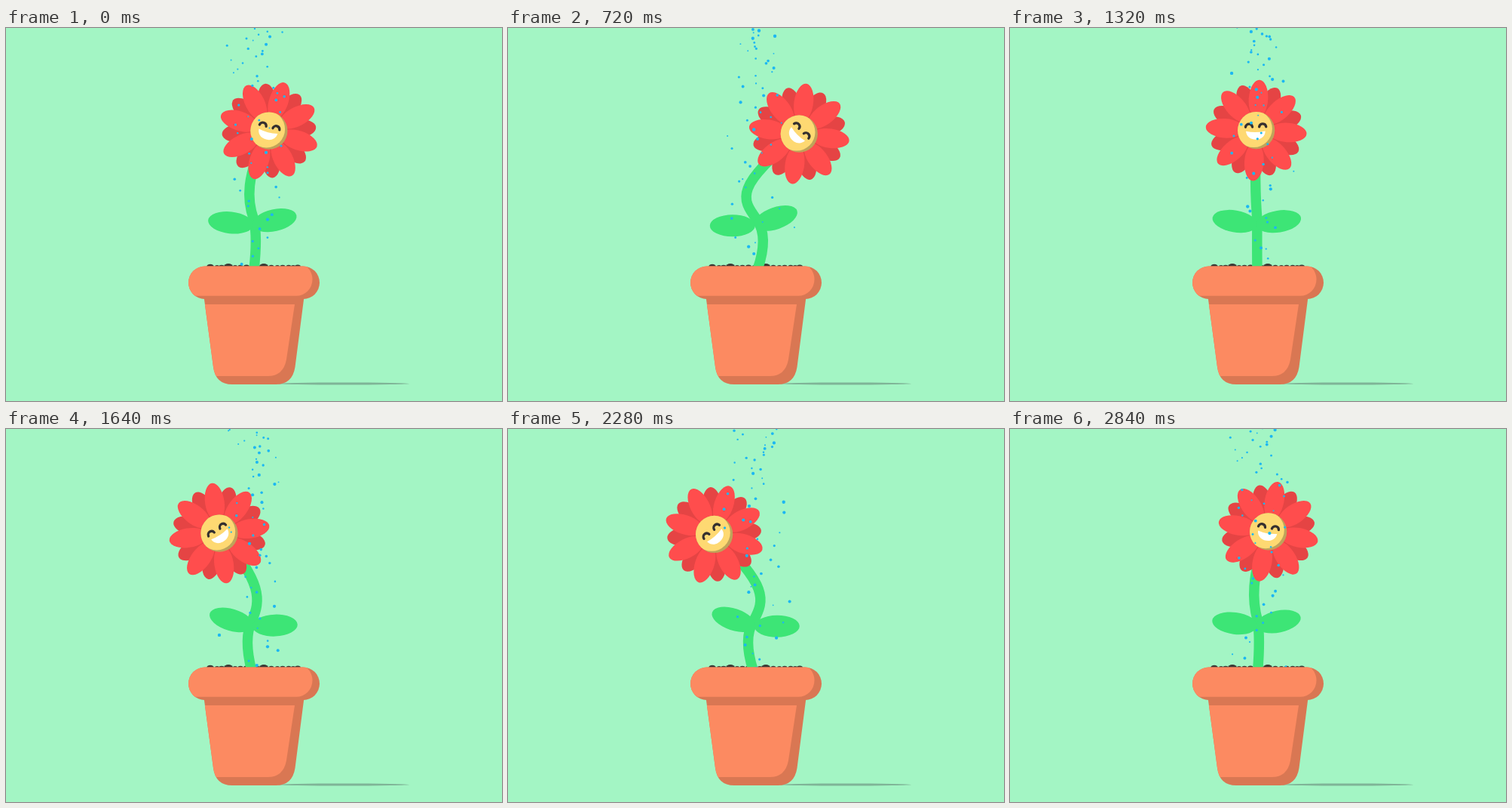
An HTML page with a canvas for the animation above (2.88 s loop, 658x494 px).

```html
<!DOCTYPE html>
<html lang="en">
<head>
<meta charset="utf-8">
<title>Dancing flower</title>
<style>
  html, body { margin: 0; width: 100%; height: 100%; overflow: hidden; background: #a3f5c4; }
  canvas { display: block; width: 658px; height: 494px; }
</style>
</head>
<body>
<canvas id="stage" width="658" height="494"></canvas>
<script>
const ctx = document.getElementById('stage').getContext('2d');
const LOOP = 2880, STEP = 40, TAU = Math.PI * 2;
const C = {
  bg: '#a3f5c4', green: '#3de576', petal: '#ff4d4d', petalBack: '#e54444',
  face: '#fed972', faceShade: '#bfa35a', ink: '#35302f', soil: '#3c3935',
  pot: '#fc8a61', potShade: '#d97753', ground: '#7fb497', water: '#1cb7f2'
};
const rad = d => d * Math.PI / 180;

function seeded(seed) {
  return () => {
    seed = (seed * 1664525 + 1013904223) >>> 0;
    return seed / 4294967296;
  };
}

const rand = seeded(41);
const spread = () => rand() + rand() - 1;
const drops = Array.from({ length: 280 }, (_, i) => ({
  birth: (i + rand()) / 280 * LOOP,
  x: 330 + spread() * 42,
  vx: spread() * 50,
  r: 0.9 + rand() * 1.3
}));

// Cubic ease (.45, 0, .55, 1)
function ease(x) {
  let lo = 0, hi = 1;
  for (let i = 0; i < 24; i++) {
    const m = (lo + hi) / 2;
    if (1.35 * m - 1.05 * m * m + 0.7 * m * m * m < x) lo = m; else hi = m;
  }
  return lo * lo * (3 - 2 * lo);
}

// Sway from -1 (left) to 1 (right)
function swayAt(t) {
  const u = ((t - 2032 + LOOP) % LOOP) / (LOOP / 2);
  return 2 * ease(u > 1 ? 2 - u : u) - 1;
}

function fill(color, trace) {
  ctx.fillStyle = color;
  ctx.beginPath();
  trace();
  ctx.fill();
}

function disc(color, x, y, rx, ry = rx) {
  fill(color, () => ctx.ellipse(x, y, rx, ry, 0, 0, TAU));
}

function placed(x, y, angle, draw) {
  ctx.save();
  ctx.translate(x, y);
  ctx.rotate(angle);
  draw();
  ctx.restore();
}

// A lit copy clipped to the shaded silhouette
function shaded(dark, light, outline, lit) {
  fill(dark, outline);
  ctx.save();
  ctx.beginPath();
  outline();
  ctx.clip();
  fill(light, lit);
  ctx.restore();
}

function drawSoil() {
  const bumps = [[271, 5], [280, 3], [286, 3.4], [295, 6], [304, 3], [311, 3.4], [319, 4],
    [327, 3], [334, 3.2], [342, 6], [352, 3.6], [360, 3], [367, 3.4], [375, 3.6], [381, 3], [387, 4]];
  for (const [x, r] of bumps) disc(C.soil, x, 316.2, r, r * 0.7);
}

function drawStem(s, hx, hy) {
  ctx.strokeStyle = C.green;
  ctx.lineWidth = 13.5;
  ctx.lineCap = 'butt';
  ctx.beginPath();
  ctx.moveTo(328 + 3 * s, 320);
  ctx.bezierCurveTo(328 + 12 * s, 295, 328 + 15 * s, 272, 328 + 2.5 * s, 254);
  ctx.bezierCurveTo(325.5 - 17.5 * s, 230 - 5 * s * s, 324 - 23.5 * s, 195 + 16 * s * s, hx, hy);
  ctx.stroke();
}

function drawLeaf(side, s) {
  placed(327.3, 261 + 0.7 * s * s, rad(-10 * s - 9.5 * side), () => {
    disc(C.green, side * 29.5, 0, 30, 14.5);
  });
}

function drawPetals(color, length, phase) {
  for (let i = 0; i < 8; i++) {
    placed(0, 0, rad(phase + i * 45), () => disc(color, 0, 25.5 - length, 12.8, 25.5));
  }
}

function drawFace() {
  ctx.strokeStyle = C.ink;
  ctx.lineWidth = 3.3;
  ctx.lineCap = 'round';
  for (const x of [-9.6, 8.6]) {
    ctx.beginPath();
    ctx.arc(x, -4, 4.6, Math.PI * 1.04, Math.PI * 1.96);
    ctx.stroke();
  }
  fill('#fff', () => {
    ctx.moveTo(-13.6, 1);
    ctx.quadraticCurveTo(-0.8, 4, 12, 1);
    ctx.bezierCurveTo(11.5, 16, -13, 16, -13.6, 1);
  });
}

function drawHead(t, s, x, y) {
  const tilt = 46.5 * s;
  const turn = t / LOOP;
  const phase = tilt + 8 + 180 * turn - 4.5 * Math.cos(TAU * turn);
  placed(x, y, 0, () => {
    drawPetals(C.petalBack, 62.5, phase + 22.5);
    drawPetals(C.petal, 67, phase);
    shaded(C.faceShade, C.face,
      () => ctx.arc(0, 0, 24.6, 0, TAU),
      () => ctx.arc(-3.4, -2.2, 24.6, 0, TAU));
  });
  placed(x, y, rad(tilt), drawFace);
}

function drawDrops(t) {
  for (const d of drops) {
    const age = ((t - d.birth + LOOP) % LOOP) / 1000;
    const y = -6 + 180 * age + 660 * age * age;
    if (y < 319) disc(C.water, d.x + d.vx * age, y, d.r);
  }
}

function drawPot() {
  disc(C.ground, 448, 471, 87, 1.5);
  shaded(C.potShade, C.pot, () => {
    ctx.moveTo(262, 352);
    ctx.lineTo(396, 352);
    ctx.lineTo(383.5, 449);
    ctx.quadraticCurveTo(380, 472, 358, 472);
    ctx.lineTo(300, 472);
    ctx.quadraticCurveTo(278, 472, 275, 449);
    ctx.closePath();
  }, () => {
    ctx.moveTo(250, 366);
    ctx.lineTo(383, 366);
    ctx.lineTo(372, 439);
    ctx.quadraticCurveTo(368, 461, 347, 461);
    ctx.lineTo(250, 461);
    ctx.closePath();
  });
  shaded(C.potShade, C.pot,
    () => ctx.roundRect(242, 315.5, 174, 43.5, 21.7),
    () => ctx.roundRect(226, 311, 180.5, 43.8, 21.7));
}

function draw(t) {
  const s = swayAt(t);
  const hx = 328 + 67 * s - 7.5 * s ** 3;
  const hy = 135.6 + 4.8 * s * s;
  ctx.fillStyle = C.bg;
  ctx.fillRect(0, 0, 658, 494);
  drawSoil();
  drawStem(s, hx, hy);
  drawLeaf(-1, s);
  drawLeaf(1, s);
  drawHead(t, s, hx, hy);
  drawDrops(t);
  drawPot();
}

const start = performance.now();
function tick() {
  const t = (performance.now() - start) % LOOP;
  draw(Math.floor(t / STEP) * STEP);
  requestAnimationFrame(tick);
}
tick();
</script>
</body>
</html>
```
